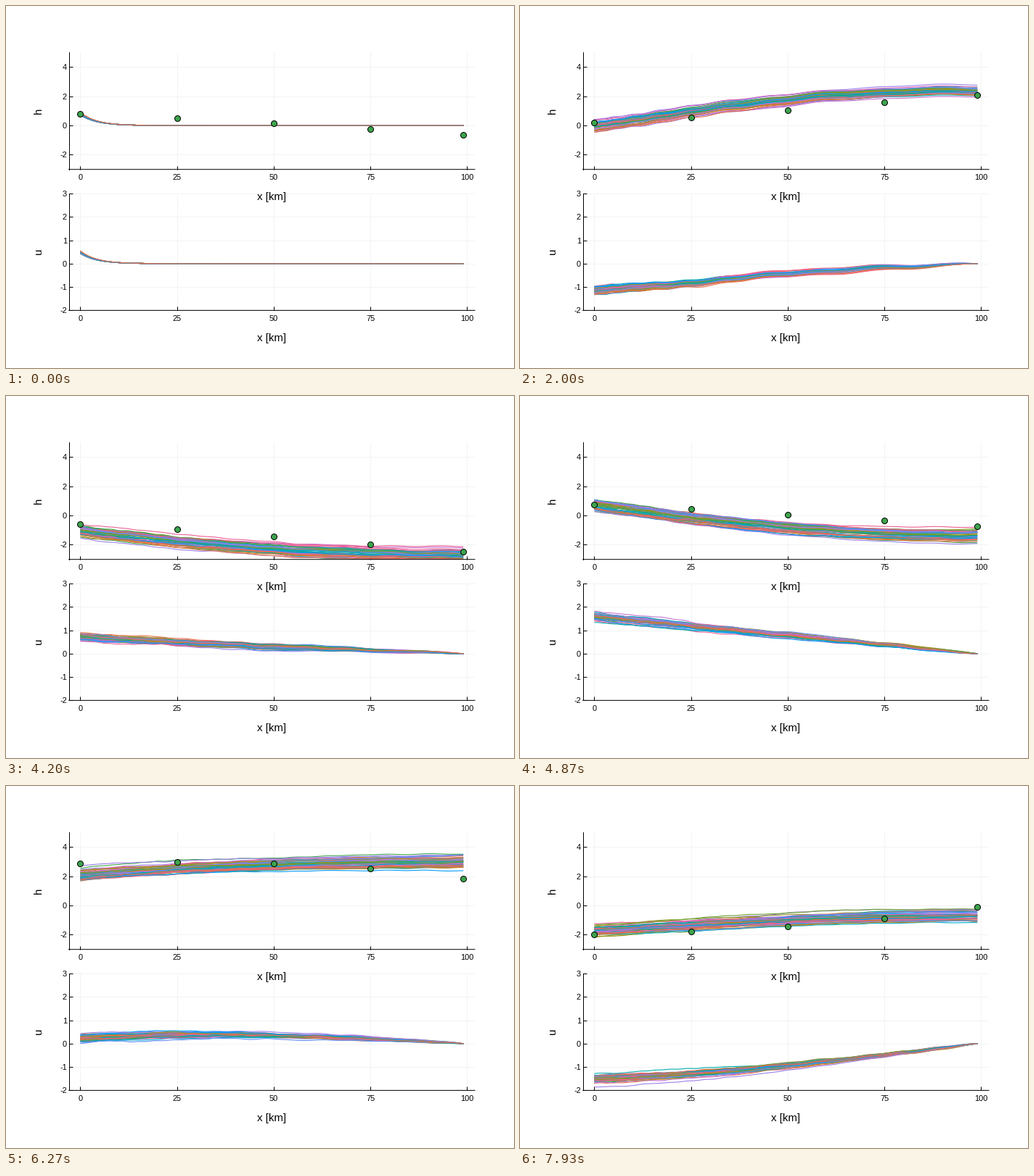
A matplotlib script that plays this animation: 700 by 500 pixels, repeating every 8 s.

```python
import numpy as np
import matplotlib.pyplot as plt
from matplotlib.animation import FuncAnimation
from matplotlib.collections import LineCollection

W, H, DPI = 700, 500, 100
LOOP, TICKS = 8000, 160
STEPS, MEMBERS, CELLS = 120, 50, 100
PX = 72 / DPI  # points per pixel
PALETTE = ["#009afa", "#e36f47", "#3ea44e", "#c371d2", "#ac8e18", "#00aaae",
           "#ed5e93", "#c68225", "#00a98d", "#8e971e", "#00a9cc", "#9b7fe9",
           "#618df6", "#f06073", "#dd65b6", "#6c9f33"]
COLORS = [PALETTE[i % len(PALETTE)] for i in range(MEMBERS)]


def wave(amp, angle, lag):
    return amp * np.cos(angle - np.radians(lag))


# Linear shallow water channel, Crank-Nicolson; state is h0, u0, h1, u1, ...
def build_model():
    g, depth, friction = 9.81, 20.0, 1 / (0.06 * 86400)
    dt, dx = 600.0, 100e3 / (CELLS + 0.5)
    size = 2 * CELLS
    a, b = np.eye(size), np.eye(size)
    b[0, 0] = b[-1, -1] = 0
    for i in range(1, size - 1):
        k = 0.5 * dt / dx * (g if i % 2 else depth)
        a[i, i - 1], a[i, i + 1] = -k, k
        b[i, i - 1], b[i, i + 1] = k, -k
        if i % 2:
            a[i, i] += 0.5 * dt * friction
            b[i, i] -= 0.5 * dt * friction
    inv = np.linalg.inv(a)
    return inv @ b, inv[:, :1]


def run(inflow):
    """Integrate from rest; inflow has one row per step, one column per run."""
    step, source = build_model()
    state = np.zeros((2 * CELLS, inflow.shape[1]))
    states = []
    for level in inflow:
        state = step @ state + source * level
        states.append(state)
    return np.array(states)


def boundary_noise(rng):
    """Red noise with a six hour memory, centred over the members."""
    alpha = np.exp(-1 / 36)
    kicks = 0.2 * np.sqrt(1 - alpha ** 2) * rng.standard_normal((STEPS, MEMBERS))
    noise, level = [], np.zeros(MEMBERS)
    for kick in kicks:
        level = alpha * level + kick
        noise.append(level)
    noise = np.array(noise)
    return noise - noise.mean(axis=1, keepdims=True)


# Lunar tide of 12.42 h in steps of 10 minutes
theta = 2 * np.pi * np.arange(STEPS)[:, None] / 74.5
diurnal = wave(0.15, theta / 2, -130)
tide = wave(2.13, theta, 62) + wave(0.16, 2 * theta, 128) + diurnal
ensemble = run(tide + boundary_noise(np.random.default_rng(7)))

# Gauge readings: the tide lags more and changes shape along the channel
stations = np.array([0, 25, 50, 75, 99])
s = stations / 99
gauges = (0.25 * (1 - s ** 2) + wave(2.35, theta, 61 + 28 * s + 27 * s ** 2)
          + wave(s ** 2 - 0.5, 2 * theta, 0) + diurnal)

plt.rcParams["font.family"] = "Liberation Sans"
fig = plt.figure(figsize=(W / DPI, H / DPI), dpi=DPI, facecolor="white")


def label(x, y, text, size, **kw):
    fig.text(x / W, 1 - y / H, text, fontsize=size * PX, va="baseline", **kw)


def panel(top, bottom, ylim, yticks, name):
    left, right, xlim = 86.6, 646.0, (-2.97, 101.97)
    ax = fig.add_axes([left / W, 1 - bottom / H, (right - left) / W, (bottom - top) / H])
    ax.set(xlim=xlim, ylim=ylim, xticks=range(0, 101, 25), yticks=yticks)
    ax.patch.set_visible(False)
    ax.spines[["top", "right"]].set_visible(False)
    ax.spines[["left", "bottom"]].set_linewidth(PX)
    ax.spines["bottom"].set_snap(False)
    ax.tick_params(direction="in", length=5 * PX, width=PX,
                   labelleft=False, labelbottom=False)
    ax.set_axisbelow(True)
    ax.grid(color="#f3f3f3", linewidth=PX)
    for v in range(0, 101, 25):
        x = left + (v - xlim[0]) / (xlim[1] - xlim[0]) * (right - left)
        label(x, bottom + 14.5, str(v), 11, ha="center")
    for v in yticks:
        y = bottom - (v - ylim[0]) / (ylim[1] - ylim[0]) * (bottom - top)
        label(84, y + 4, str(v), 11, ha="right")
    label(366.5, bottom + 42.5, "x [km]", 15, ha="center")
    label(49, (top + bottom) / 2 - 0.5, name, 15, ha="center",
          rotation=90, rotation_mode="anchor")
    lines = LineCollection([], colors=COLORS, linewidths=1.1 * PX, zorder=2)
    ax.add_collection(lines, autolim=False)
    return ax, lines


h_ax, h_lines = panel(64, 225.7, (-3, 5), range(-2, 5, 2), "h")
u_ax, u_lines = panel(259, 420.4, (-2, 3), range(-2, 4), "u")
dots, = h_ax.plot([], [], "o", color="#3da44d", markeredgecolor="black",
                  markersize=8 * PX, markeredgewidth=PX, zorder=5)
km = np.arange(CELLS)


def segments(values):
    return [np.column_stack([km, v]) for v in values.T]


def draw(tick):
    step = int(tick * STEPS / TICKS + 0.5)
    h_lines.set_segments(segments(ensemble[step, 0::2]))
    u_lines.set_segments(segments(ensemble[step, 1::2]))
    dots.set_data(stations, gauges[step])
    return h_lines, u_lines, dots


anim = FuncAnimation(fig, draw, frames=TICKS, interval=LOOP // TICKS,
                     repeat=True, repeat_delay=0)
plt.show()
```
